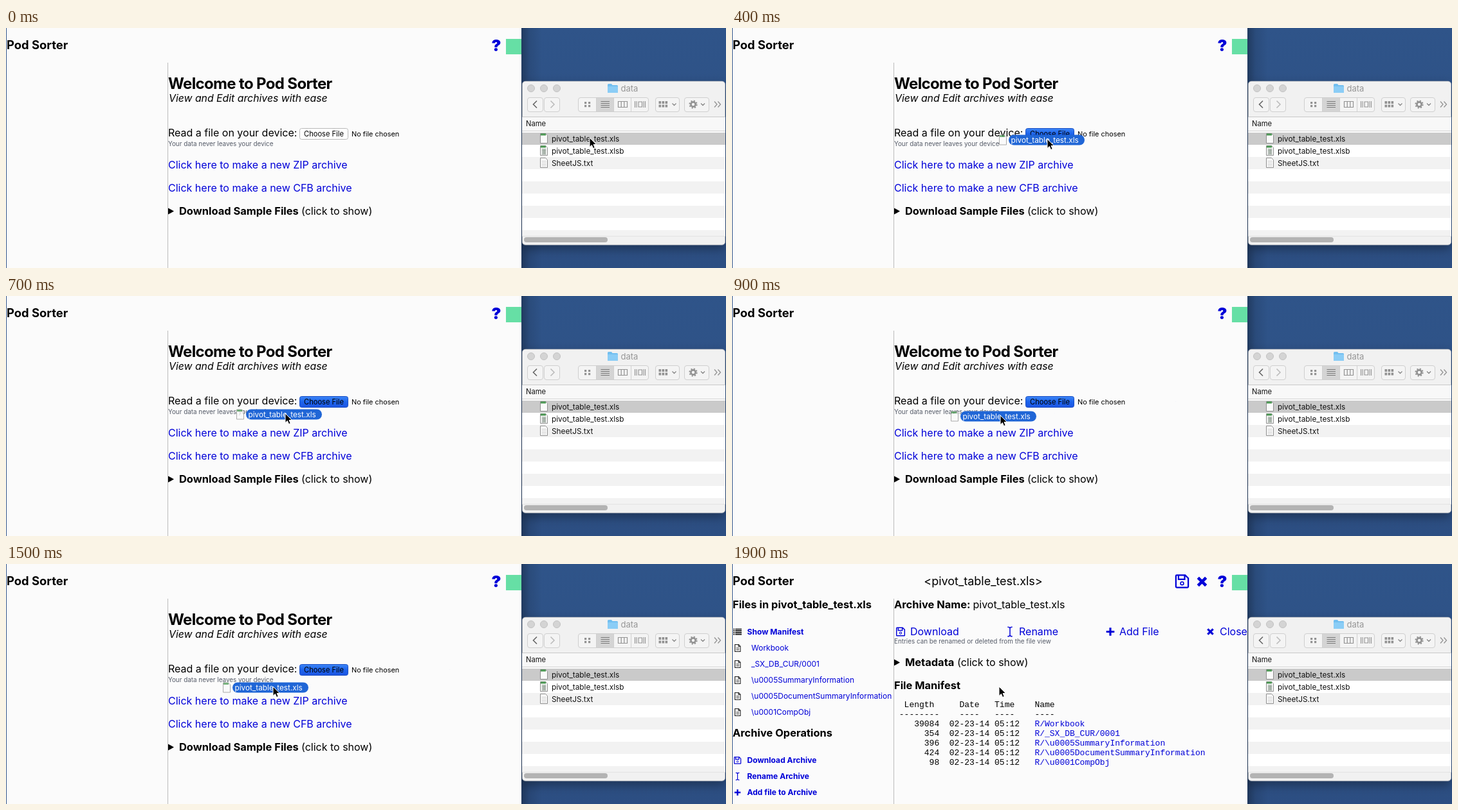
Recreate the animation shown at these times as an HTML page. Size 1119 px wide and 374 px high, loop 2 s.

```html
<!DOCTYPE html>
<html lang="en">
<head>
<meta charset="utf-8">
<title>Archive drop</title>
<style>
html, body { margin: 0; width: 100%; height: 100%; overflow: hidden; }
svg { display: block; width: 100%; height: 100%; }
text { font-family: Inter, sans-serif; font-optical-sizing: none; white-space: pre; }
.mono { font-family: "Liberation Mono", monospace; }
</style>
</head>
<body>
<svg id="stage" viewBox="0 0 1119 374" xmlns="http://www.w3.org/2000/svg"></svg>
<script>
const BLUE = '#0000d8', APP = 'Pod Sorter', FILE = 'pivot_table_test.xls';
const BODY = 16, HEAD = 16.45, SMALL = 9.87;

const esc = s => s.replace(/&/g, '&amp;').replace(/</g, '&lt;');
const text = (x, y, size, str, fill = '#000', attrs = '') =>
  `<text x="${x}" y="${y}" font-size="${size}" fill="${fill}" ${attrs}>${esc(str)}</text>`;
const bold = (x, y, size, str, fill = '#000', attrs = '') =>
  text(x, y, size, str, fill, 'font-weight="700" ' + attrs);
const rect = (x, y, w, h, fill, attrs = '') =>
  `<rect x="${x}" y="${y}" width="${w}" height="${h}" fill="${fill}" ${attrs}/>`;
const path = (d, stroke, width = 1, attrs = '') =>
  `<path d="${d}" fill="none" stroke="${stroke}" stroke-width="${width}" ${attrs}/>`;
const at = (x, y, body, scale = 1) =>
  `<g transform="translate(${x} ${y}) scale(${scale})">${body}</g>`;
const group = (id, body) => `<g id="${id}">${body}</g>`;

// Icons are centred on their own origin.
const floppy = path('M-6-5.2Q-6-6-5.2-6H3L6-3V5.2Q6 6 5.2 6H-5.2Q-6 6-6 5.2ZM-3.5-6V-2H2.5V-6', BLUE, 1.4) +
  `<circle cy="2" r="1.5" fill="none" stroke="${BLUE}"/>`;
const cross = path('M-4-4L4 4M4-4L-4 4', BLUE, 3);
const plus = path('M-6 0H6M0-6V6', BLUE, 3);
const beam = path('M-3.5-7Q0-7 0-5Q0-7 3.5-7M0-5V5M-3.5 7Q0 7 0 5Q0 7 3.5 7', BLUE, 1.4);
const list = path('M-6.5-4H-4.5M-6.5-1.3H-4.5M-6.5 1.4H-4.5M-6.5 4.1H-4.5M-3.5-4H6.5M-3.5-1.3H6.5M-3.5 1.4H6.5M-3.5 4.1H6.5', '#111', 1.7);
const sheet = path('M-4.2-5.5H1.5L4.2-2.8V5.5H-4.2ZM1.2-5.5V-2.5H4.2M-2.2 0H2.2M-2.2 2.7H2.2', '#222', 1.1);
const marker = (x, y) => `<path d="M${x} ${y - 5}L${x + 9} ${y}L${x} ${y + 5}Z"/>`;

const docIcon = kind => {
  const page = '<path d="M-5.5-7.5H2.5L5.5-4.5V7.5H-5.5Z" fill="#fafafa" stroke="#8f8f8f"/>';
  const lines = path('M-3.5-2.5H3.5M-3.5 0H3.5M-3.5 2.5H3.5M-3.5 5H3.5', '#c6c6c6', .8);
  const band = rect(-5, -7.5, 8, 3, '#4d9a55');
  const grid = path('M-3.5-2H3.5M-3.5 .5H3.5M-3.5 3H3.5M-3.5 5.5H3.5M-1-2V5.5M1.5-2V5.5', '#66796a', .8);
  return page + (kind === 'txt' ? lines : kind === 'xlsb' ? band + grid : band);
};

function finder() {
  const button = (x, w) => rect(x + .5, 108.5, w, 22, '#f4f4f4', 'rx="3.5" stroke="#cfcfcf"');
  const gray = '#929292';
  let s = rect(802.3, 83, 315.4, 255, '#f1f1f1', 'rx="5" stroke="#b5b5b5" stroke-width=".6" filter="url(#shadow)"');
  for (const x of [816, 836, 856])
    s += `<circle cx="${x}" cy="94" r="5.5" fill="#d4d4d4" stroke="#c2c2c2"/>`;
  s += '<path d="M935 88.5Q935 87 936.5 87H941L942.5 89H949.5Q951 89 951 90.5V100Q951 101 950 101H936Q935 101 935 100Z" fill="#72bff0"/>' +
    rect(935, 91, 16, 10, '#8bcdf6', 'rx="1"');
  s += text(955.5, 99, 13, 'data', '#969696');
  s += button(810, 24) + button(836, 24) + button(889, 109) + button(1009, 37) + button(1054, 38);
  s += path('M825 113.5L819.5 119L825 124.5', '#666', 1.6) + path('M846.5 113.5L852 119L846.5 124.5', '#bcbcbc', 1.6);
  s += rect(918, 109, 26, 21, '#d4d4d4') + path('M917.5 109V130M944.5 109V130M971.5 109V130', '#d0d0d0');
  for (const x of [899, 905]) for (const y of [115, 120]) s += rect(x, y, 3.2, 3.2, gray);
  s += path('M924.5 114.5H938M924.5 117.5H938M924.5 120.5H938M924.5 123.5H938', '#777', 1.2);
  s += path('M951.5 114.5H965.5V123.5H951.5ZM956.2 114.5V123.5M960.8 114.5V123.5', gray, 1.2);
  s += path('M977.5 114V124M980 114V124M991 114V124M993.5 114V124M983 115H988.5V123H983Z', gray, 1.1);
  for (const x of [1014.5, 1019.5, 1024.5]) for (const y of [114, 119.5]) s += rect(x, y, 3.6, 4, gray);
  s += path('M1035.5 117.5L1038.5 120.5L1041.5 117.5M1080 117.5L1083 120.5L1086 117.5', '#888', 1.3);
  s += `<circle cx="1068" cy="119" r="3.6" fill="none" stroke="${gray}" stroke-width="2.6"/>` +
    `<circle cx="1068" cy="119" r="5.6" fill="none" stroke="${gray}" stroke-width="2" stroke-dasharray="2.2 2.2"/>`;
  s += path('M1101 114.5L1105 119L1101 123.5M1106.5 114.5L1110.5 119L1106.5 123.5', gray, 1.3);
  s += rect(802, 138, 316, 186, '#fff') + rect(802, 138, 316, 23, '#f8f8f8') +
    path('M802 138.5H1118', '#c8c8c8') + path('M802 160.5H1118', '#d2d2d2');
  s += text(808, 153, 11.2, 'Name', '#111');
  s += rect(802, 163, 316, 19, '#cacaca');
  for (let y = 201; y < 324; y += 38) s += rect(802, y, 316, Math.min(19, 324 - y), '#f2f2f2');
  [[FILE, 'xls'], [FILE + 'b', 'xlsb'], ['SheetJS.txt', 'txt']].forEach(([name, kind], i) => {
    s += at(836, 172 + 19 * i, docIcon(kind)) + text(848, 177 + 19 * i, 11.8, name, '#111');
  });
  s += path('M802 324.5H1118', '#e2e2e2') + rect(805, 326, 130, 8, '#b3b3b3', 'rx="4"');
  return s;
}

function frame() {
  return rect(0, 0, 801, 374, '#fbfbfb') + rect(0, 0, 1, 374, '#34568b') +
    path('M251.5 54V374', '#bdbdbd') +
    bold(1, 33, 18.4, APP) +
    text(762, 35.5, 25, '?', BLUE, 'font-weight="900" text-anchor="middle"') +
    rect(777, 17, 24, 24, '#66dfa5');
}

function welcome() {
  return bold(252, 95, 24, 'Welcome to ' + APP, '#000', 'letter-spacing="-.65"') +
    text(253, 115, 15.8, 'View and Edit archives with ease', '#000', 'font-style="italic"') +
    text(252, 169, BODY, 'Read a file on your device:') +
    `<rect id="choose" x="456.5" y="156.5" width="75" height="17" rx="3"/>` +
    text(494, 169, 11.1, 'Choose File', '#000', 'text-anchor="middle"') +
    text(537, 169, 10.9, 'No file chosen') +
    text(252, 184, SMALL, 'Your data never leaves your device', '#555b68') +
    text(252, 219, BODY, 'Click here to make a new ZIP archive', BLUE) +
    text(252, 255, BODY, 'Click here to make a new CFB archive', BLUE) +
    marker(252, 285.5) + bold(269, 291, HEAD, 'Download Sample Files') +
    text(459, 291, BODY, '(click to show)');
}

function archive() {
  const entries = [
    [39084, 'Workbook'], [354, '_SX_DB_CUR/0001'], [396, '\\u0005SummaryInformation'],
    [424, '\\u0005DocumentSummaryInformation'], [98, '\\u0001CompObj']
  ];
  const mono = (x, y, str, fill) => text(x, y, 13, str, fill, 'class="mono"');
  let s = text(390.5, 33, 18, `<${FILE}>`, '#000', 'text-anchor="middle"') +
    at(699.5, 27, floppy, 1.6) + at(730.5, 27.5, cross, 1.55);

  s += bold(1, 69, HEAD, 'Files in ' + FILE) +
    at(8.5, 105.5, list) + bold(23.5, 110, 12.1, 'Show Manifest', BLUE);
  entries.forEach(([size, name], i) => {
    const y = 131 + 25 * i, row = 253 + 15 * i;
    s += at(8.8, y, sheet) + text(30, y + 4, 12, name, BLUE);
    s += mono(252, row, String(size).padStart(9) + '  02-23-14 05:12') + mono(470.4, row, 'R/' + name, BLUE);
  });
  s += bold(1, 269, HEAD, 'Archive Operations');
  [[floppy, 'Download Archive', .85], [beam, 'Rename Archive', .8], [plus, 'Add file to Archive', .78]]
    .forEach(([icon, label, scale], i) => {
      s += at(8.6, 306 + 25 * i, icon, scale) + bold(23.5, 310 + 25 * i, 12.1, label, BLUE);
    });

  s += bold(252, 69, HEAD, 'Archive Name:') + text(374.5, 69, BODY, FILE);
  [[floppy, 262, 'Download', 277], [beam, 432, 'Rename', 446], [plus, 588, 'Add File', 602], [cross, 743.5, 'Close', 758]]
    .forEach(([icon, ix, label, x]) => {
      s += at(ix, 105.5, icon, 1.05) + text(x, 111, BODY, label, BLUE);
    });
  s += text(252, 124, SMALL, 'Entries can be renamed or deleted from the file view', '#555b68') +
    marker(252, 153.5) + bold(269, 159, HEAD, 'Metadata') + text(350, 159, BODY, '(click to show)') +
    bold(252, 195, HEAD, 'File Manifest') +
    mono(252, 223, '  Length     Date   Time    Name') +
    mono(252, 238, ' --------    ----   ----    ----');
  return s;
}

const ghost = `<g opacity=".75">${at(-9, 0, docIcon('xls'))}</g>` +
  rect(0, -8, 118, 16, '#2066d6', 'rx="8"') + text(3.5, 4.5, 11.8, FILE, '#fff');
const arrow = '<path d="M0 0V14.5L3.4 11.4L5.6 16.6L8.2 15.5L6 10.5H10.4Z" fill="#000" stroke="#fff" stroke-width="1"/>';

const svg = document.getElementById('stage');
svg.innerHTML = `<defs>
  <linearGradient id="desk" x2="0" y2="1"><stop stop-color="#2f5489"/><stop offset="1" stop-color="#2c4e82"/></linearGradient>
  <linearGradient id="edge"><stop stop-opacity=".3"/><stop offset=".4" stop-opacity=".1"/><stop offset="1" stop-opacity="0"/></linearGradient>
  <linearGradient id="hot" x2="0" y2="1"><stop stop-color="#3d86f6"/><stop offset=".5" stop-color="#1c63ec"/><stop offset="1" stop-color="#1d55e2"/></linearGradient>
  <filter id="shadow" x="-20%" y="-20%" width="140%" height="140%"><feDropShadow dx="0" dy="6" stdDeviation="8" flood-opacity=".35"/></filter>
  <clipPath id="page"><rect width="801" height="374"/></clipPath>
</defs>` + rect(0, 0, 1119, 374, 'url(#desk)') + rect(801, 0, 32, 374, 'url(#edge)') + finder() +
  `<g clip-path="url(#page)">${frame()}${group('welcome', welcome())}${group('archive', archive())}</g>` +
  group('ghost', ghost) + group('cursor', arrow);

const el = id => svg.getElementById(id);
const show = (id, on) => el(id).setAttribute('display', on ? 'inline' : 'none');
const move = (id, x, y) => el(id).setAttribute('transform', `translate(${x} ${y})`);

const LOOP = 2000, STEP = 100, HOT = 300, DROP = 1600;
// time, cursor x, cursor y, label offset from the cursor
const PATH = [
  [0, 907, 171, -60], [100, 785, 167, -60], [200, 631, 163, -60], [300, 545, 167, -60],
  [400, 490, 173, -60], [600, 443, 181, -60], [900, 417, 186, -62], [1500, 415, 191, -63], [LOOP, 415, 191, -63]
];

function pose(t) {
  const i = PATH.findIndex((p, k) => k && t <= p[0]);
  const a = PATH[i - 1], b = PATH[i], u = (t - a[0]) / (b[0] - a[0]);
  return a.map((v, k) => Math.round(v + (b[k] - v) * u));
}

function draw(now) {
  const t = Math.floor((now % LOOP) / STEP) * STEP;
  const [, x, y, offset] = pose(t);
  const open = t >= DROP, hot = t >= HOT;
  show('welcome', !open);
  show('archive', open);
  show('ghost', t > 0 && !open);
  el('choose').setAttribute('fill', hot ? 'url(#hot)' : '#fff');
  el('choose').setAttribute('stroke', hot ? '#1b4fc4' : '#b9b9b9');
  move('cursor', x, y);
  move('ghost', x + offset, y + 1.5);
}

const start = performance.now();
function tick() {
  draw(performance.now() - start);
  requestAnimationFrame(tick);
}
tick();
</script>
</body>
</html>
```
